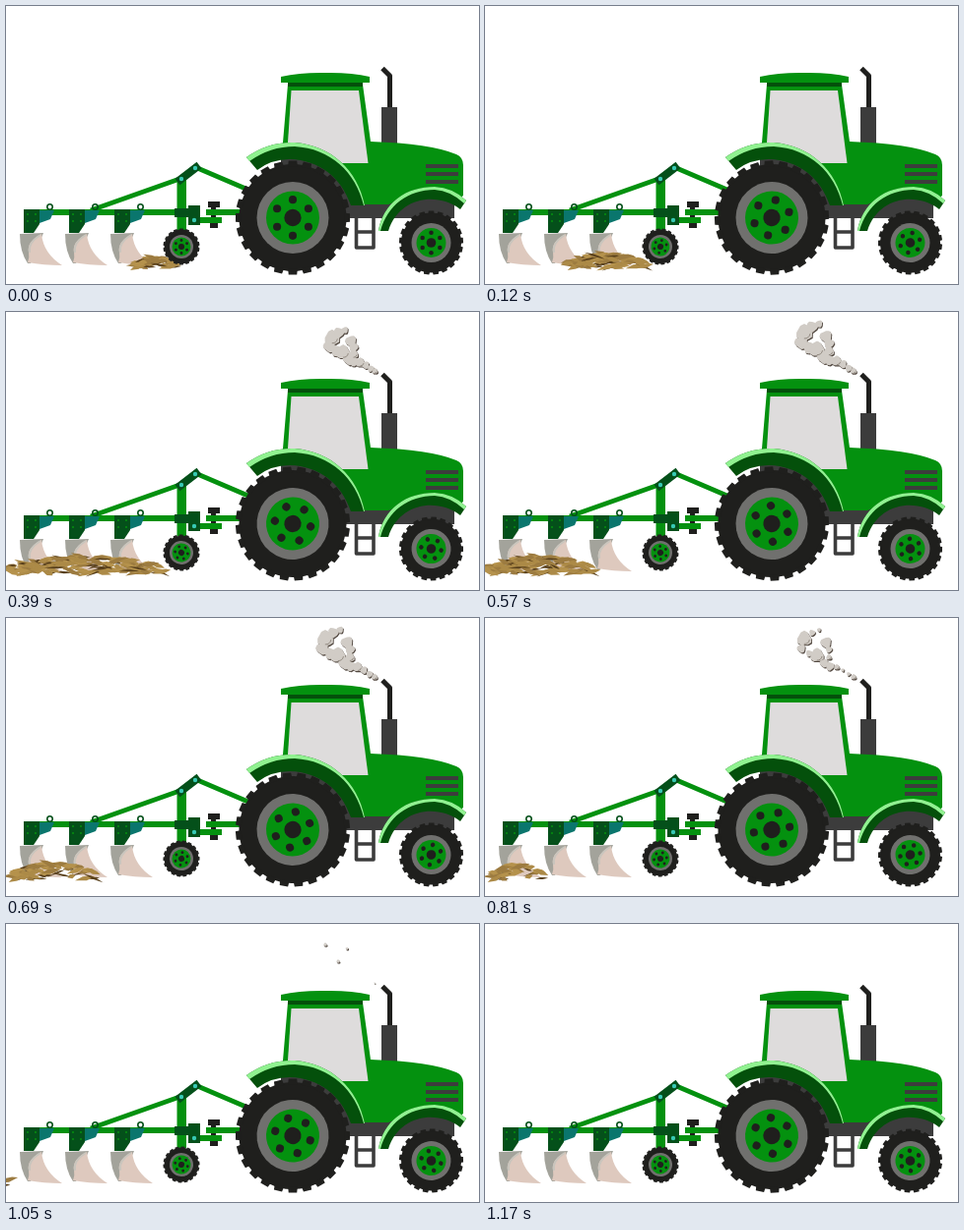
Write an HTML page with a canvas that moves like this. It is 480 by 283 pixels and loops after 1200 ms.

```html
<!DOCTYPE html>
<html lang="en">
<head>
<meta charset="utf-8">
<title>Tractor and plough</title>
<style>
html, body { margin: 0; width: 100%; height: 100%; overflow: hidden; background: #fff; }
canvas { display: block; width: 480px; height: 283px; }
</style>
</head>
<body>
<canvas id="stage" width="480" height="283"></canvas>
<script>
const ctx = document.getElementById('stage').getContext('2d');
const LOOP = 1200, STEP = 30;
const GREEN = '#04910f', DEEP = '#04500b', BRACKET = '#04501a', LIGHT = '#91f291';
const BLACK = '#1f1f1d', STEEL = '#3c3c3c', RIM = '#70706e', TEAL = '#0a766d', PIN = '#38c9b4';

const clamp = v => Math.max(0, Math.min(1, v));

function random(seed) {
  return () => {
    seed = (seed * 1664525 + 1013904223) >>> 0;
    return seed / 4294967296;
  };
}

function fill(d, color) {
  ctx.fillStyle = color;
  ctx.fill(new Path2D(d));
}

function stroke(d, color, width) {
  ctx.strokeStyle = color;
  ctx.lineWidth = width;
  ctx.stroke(new Path2D(d));
}

function rect(x, y, w, h, color) {
  ctx.fillStyle = color;
  ctx.fillRect(x, y, w, h);
}

function disc(x, y, r, color) {
  ctx.fillStyle = color;
  ctx.beginPath();
  ctx.arc(x, y, r, 0, Math.PI * 2);
  ctx.fill();
}

// Linear interpolation through rows of [time, value, value, ...].
function keyed(rows, t) {
  let i = 1;
  while (i < rows.length - 1 && rows[i][0] < t) i++;
  const a = rows[i - 1], b = rows[i];
  const k = clamp((t - a[0]) / (b[0] - a[0]));
  return a.slice(1).map((v, n) => v + (b[n + 1] - v) * k);
}

function wheel(x, y, r, lugs, rim, hub, angle) {
  ctx.save();
  ctx.translate(x, y);
  ctx.rotate(angle);
  disc(0, 0, r * 0.94, BLACK);
  const w = r * 1.75 / lugs;
  for (let i = 0; i < lugs; i++) {
    ctx.save();
    ctx.rotate(i * Math.PI * 2 / lugs);
    fill(`M${-w * 1.15},${-r * 0.9}L${-w},${-r}L${w},${-r}L${w * 1.15},${-r * 0.9}Z`, BLACK);
    ctx.restore();
  }
  disc(0, 0, rim, RIM);
  disc(0, 0, hub, GREEN);
  disc(0, 0, hub * 0.32, BLACK);
  for (let i = 0; i < 6; i++) {
    const a = i * Math.PI / 3 - Math.PI / 2;
    disc(Math.cos(a) * hub * 0.68, Math.sin(a) * hub * 0.68, hub * 0.15, BLACK);
  }
  ctx.restore();
}

function tractorBody() {
  // Exhaust
  ctx.lineJoin = 'round';
  stroke('M389.5 104V71L382 63.5', BLACK, 5);
  rect(381, 103, 16, 38, STEEL);
  // Cab and bonnet
  fill('M286 80H362L370 138Q431 140 457 151Q464 154 464 162V193L450 203H346L318 160H281V139Z', GREEN);
  fill('M289.5 86H358L367.5 160H285L286 139Z', '#dedcdc');
  rect(286, 78, 76, 4, DEEP);
  fill('M279 78V72Q299 67.5 324 68Q350 67.5 369 72V78Z', GREEN);
  for (let i = 0; i < 3; i++) rect(426, 161 + i * 8, 33, 4, STEEL);
  // Chassis and step
  fill('M279 152H320L350 180V202H388L412 193L440 190L455 198V216H342L279 190Z', STEEL);
  stroke('M355.5 214V246H373V214M355.5 230H373', STEEL, 3.6);
  // Rear mudguard
  fill('M244 154Q266 138 293 139C330 142 357 167 364 203H350C340 174 318 157 288 156Q269 156 255 167Z', DEEP);
  fill('M244 154Q266 138 293 139C330 142 357 167 364 203H363C355 169 329 145 293 143Q268 143 247 158Z', LIGHT);
  // Front mudguard
  fill('M378 229C383 200 406 184 435 184Q454 185 467 198L461 207C438 189 399 194 388 229Z', DEEP);
  fill('M378 229C383 200 406 184 435 184Q454 185 467 198L465 201Q451 188 435 187C408 187 387 203 380 229Z', LIGHT);
}

function ploughFrame() {
  // Hitch
  rect(208, 199, 5, 27, BLACK);
  rect(205, 199, 12, 6, BLACK);
  rect(207, 220, 8, 6, BLACK);
  rect(203, 207, 38, 6, GREEN);
  rect(190, 215, 29, 6, GREEN);
  // Beam and braces
  rect(18, 207, 170, 6, GREEN);
  rect(173.5, 176, 9.5, 52, GREEN);
  stroke('M86 208L179 175M192 164L248 188', GREEN, 5);
  stroke('M174 179L196 162', BRACKET, 8);
  disc(178, 176, 2.2, PIN);
  disc(192, 165, 2.2, PIN);
  rect(171, 206, 14, 9, BRACKET);
  rect(185, 203, 12, 20, BRACKET);
  disc(191, 218, 2.2, PIN);
}

function blade(x) {
  ctx.save();
  ctx.translate(x, 0);
  fill('M14 232L38 231L25 262H22Q14 250 14 232Z', '#a3a39b');
  fill('M36 232Q38 252 57 264Q38 264 22 261Q24 256 23 250Q21 240 36 232Z', '#dec9be');
  stroke('M35 233Q22 241 24 251', '#c9c5bd', 2);
  fill('M33 208H49L45 217L34 221Z', TEAL);
  fill('M18 207H34V222L28 231H18Z', BRACKET);
  for (const [px, py] of [[22, 212], [30, 212], [22, 219], [30, 219]]) disc(px, py, 1, GREEN);
  ctx.strokeStyle = BRACKET;
  ctx.lineWidth = 1.6;
  ctx.beginPath();
  ctx.arc(44.5, 204.5, 2.7, 0, Math.PI * 2);
  ctx.stroke();
  ctx.restore();
}

// time, left edge, right edge, height, share of clods
const SOIL = [
  [0, 121, 180, 10, 0.34], [240, 29, 163, 18, 0.85], [390, -6, 168, 18, 1],
  [570, -7, 118, 18, 0.75], [690, -7, 100, 17, 0.42], [930, 0, 34, 14, 0.03], [1095, -12, 0, 4, 0]
];
const SOIL_TONES = ['#ac8a47', '#b5924c', '#9c7b40', '#59401c'];

function soil(t) {
  const [left, right, height, share] = keyed(SOIL, t);
  const rnd = random(41), count = 135;
  for (let i = 0; i < count; i++) {
    const u = rnd(), lift = rnd(), len = 4 + rnd() * 8, tilt = (rnd() - 0.5) * 0.9;
    const tone = SOIL_TONES[Math.floor(rnd() * 4)];
    if (i >= count * share) continue;
    const x = left + len + (right - left - 2 * len) * u;
    const y = 266 - lift * height * (0.4 + 0.55 * Math.sin(Math.PI * u));
    const thick = tone === SOIL_TONES[3] ? 1.1 : 2.4;
    ctx.save();
    ctx.translate(x, y);
    ctx.rotate(tilt);
    fill(`M${-len} 0L${-len * 0.2} ${-thick}L${len * 0.5} ${-thick * 0.7}L${len} 0.4L${len * 0.1} ${thick}Z`, tone);
    ctx.restore();
  }
}

// Fully grown puffs from the pipe upward: x, y, radius, life
const PUFFS = [
  [374, 60, 3, 1], [369, 57, 3.5, 0.6], [363, 53, 4, 0.55], [357, 50, 5, 0.6],
  [350, 49, 5, 0.9], [344, 46, 6.5, 0.65], [337, 38, 7.5, 1], [329, 36, 6, 0.6],
  [321, 31, 6.5, 0.65], [324, 21, 8, 1], [332, 15, 5.5, 0.6], [339, 12, 3.5, 0.6],
  [349, 40, 5, 0.6], [349, 32, 5, 0.65], [346, 25, 6, 1]
];

function puffShape(p, dx, dy, color) {
  ctx.fillStyle = color;
  ctx.beginPath();
  for (let a = 0; a < 12; a++) {
    const angle = a * Math.PI / 6;
    const r = p.r * (1 + 0.14 * Math.sin(angle * 3 + p.phase));
    ctx.lineTo(p.x + dx + Math.cos(angle) * r, p.y + dy + Math.sin(angle) * r);
  }
  ctx.fill();
}

function smoke(t) {
  if (t < 200 || t > 1090) return;
  const grow = clamp((t - 190) / 230);
  const fade = clamp((t - 570) / 520);
  const puffs = PUFFS.map(([x, y, r, life], i) => ({
    x: 377 + (x - 377) * grow,
    y: 61 + (y - 61) * grow,
    r: r * (0.4 + 0.6 * grow) * clamp(1 - (fade / life) ** 3),
    phase: i * 2.1
  })).filter(p => p.r > 0.4);
  for (const p of puffs) puffShape(p, 0.8, 1.1, '#51473f');
  for (const p of puffs) puffShape(p, 0, 0, '#d1ccc6');
  ctx.lineWidth = 0.8;
  ctx.strokeStyle = '#857b72';
  puffs.forEach((p, i) => {
    if (i % 3 || p.r < 2) return;
    ctx.beginPath();
    ctx.arc(p.x, p.y, p.r * 0.75, 0.2, 1.6);
    ctx.stroke();
  });
}

function draw(t) {
  rect(0, 0, 480, 283, '#fff');
  // A third of a turn brings the evenly spaced lugs and holes back into place.
  const turn = t / LOOP * Math.PI * 2 / 3;
  smoke(t);
  ploughFrame();
  for (let i = 0; i < 3; i++) blade(i * 46);
  soil(t);
  wheel(178, 245, 18.5, 18, 12, 9.5, turn);
  tractorBody();
  wheel(291, 215.5, 58, 24, 36.5, 27, turn);
  wheel(431.5, 241, 32.5, 21, 20, 15, turn);
}

function tick() {
  draw(Math.floor(performance.now() % LOOP / STEP) * STEP);
  requestAnimationFrame(tick);
}
tick();
</script>
</body>
</html>
```
